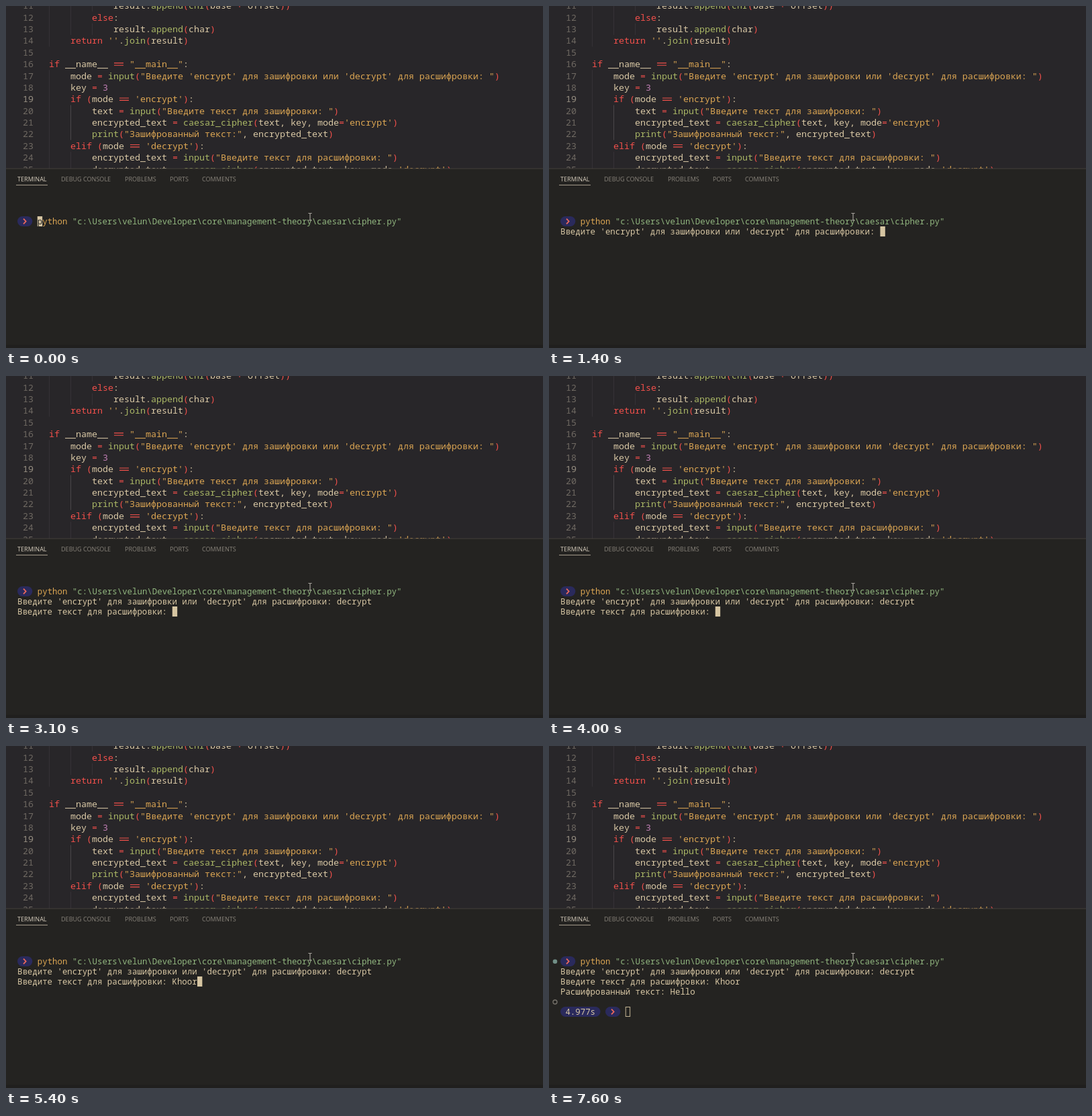
Animation, 800 px wide and 509 px high, one loop 7700 ms. Source, as an HTML page:

```html
<!DOCTYPE html>
<html lang="ru">
<head>
<meta charset="utf-8">
<title>Caesar cipher demo</title>
<style>
  html, body { margin: 0; width: 100%; height: 100%; overflow: hidden; background: #242321; }
  svg { display: block; width: 800px; height: 509px; }
  text { white-space: pre; }
  .code, .term { font-family: "Noto Sans Mono", "DejaVu Sans Mono", monospace; fill: #d9c8a5; }
  .code { font-size: 13.333px; }
  .term { font-size: 12.407px; }
  .tab { font-family: "Open Sans", "Noto Sans", sans-serif; font-size: 9.05px; fill: #8a857c; }
</style>
</head>
<body>
<svg id="stage" viewBox="0 0 800 509">
  <clipPath id="pane"><rect width="800" height="242"/></clipPath>
  <rect width="800" height="242" fill="#282629"/>
  <g id="editor" class="code" clip-path="url(#pane)"></g>
  <rect y="242" width="800" height="267" fill="#242321"/>
  <rect y="241.5" width="800" height="1" fill="#45413c"/>
  <rect y="504" width="800" height="5" fill="#201f1e"/>
  <g id="tabs"></g>
  <rect x="15" y="266" width="47" height="1" fill="#a39a8a"/>
  <g id="terminal" class="term"></g>
  <path d="M450.5 308.5h2l.5 .7 .5-.7h2M453 309v9.5M450.5 319h2l.5-.7 .5 .7h2" fill="none" stroke="#b9b5ae"/>
</svg>
<script>
const LOOP = 7700;
const COLORS = { red: '#f2504b', str: '#dca653', fn: '#a9b665', num: '#c07fb4', fg: '#d9c8a5', dark: '#242321' };
const CODE = [
  "            result.append(chr(base + offset))",
  "        else:",
  "            result.append(char)",
  "    return ''.join(result)",
  "",
  "if __name__ == \"__main__\":",
  "    mode = input(\"Введите 'encrypt' для зашифровки или 'decrypt' для расшифровки: \")",
  "    key = 3",
  "    if (mode == 'encrypt'):",
  "        text = input(\"Введите текст для зашифровки: \")",
  "        encrypted_text = caesar_cipher(text, key, mode='encrypt')",
  "        print(\"Зашифрованный текст:\", encrypted_text)",
  "    elif (mode == 'decrypt'):",
  "        encrypted_text = input(\"Введите текст для расшифровки: \")",
  "        decrypted_text = caesar_cipher(encrypted_text, key, mode='decrypt')"
];
const FIRST_LINE = 11, ACTIVE_LINE = 19;
const $ = id => document.getElementById(id);

function el(parent, tag, attrs = {}, content) {
  const node = document.createElementNS('http://www.w3.org/2000/svg', tag);
  for (const key in attrs) node.setAttribute(key, attrs[key]);
  if (content !== undefined) node.textContent = content;
  parent.appendChild(node);
  return node;
}

// Editor
const CHAR = 8, CODE_X = 64;
const baseline = n => 21.7 + (n - 12) * 17.37;

function guide(x, from, to, color) {
  const y = baseline(from) - 13.2;
  el($('editor'), 'rect', { x, y, width: 1, height: baseline(to) + 4.1 - y, fill: color });
}

function tokenColor(token, rest) {
  if (/^["']/.test(token)) return COLORS.str;
  if (/^\d/.test(token)) return COLORS.num;
  if (/^(if|elif|else|return)$/.test(token) || /^[=+()]/.test(token)) return COLORS.red;
  if (/^\w/.test(token) && rest[0] === '(') return COLORS.fn;
  return COLORS.fg;
}

function codeLine(source, n) {
  const y = baseline(n), editor = $('editor');
  el(editor, 'text', { x: 41, y, 'text-anchor': 'end', fill: n === ACTIVE_LINE ? '#989083' : '#6f6962' }, n);
  const indent = source.search(/\S/);
  if (indent < 0) return;
  const line = el(editor, 'text', { x: CODE_X + indent * CHAR, y });
  for (const match of source.matchAll(/"[^"]*"|'[^']*'|\w+|==|\s+|./g)) {
    const token = match[0], at = match.index;
    if (at < indent) continue;
    if (token === '==') {
      const x = CODE_X + at * CHAR + 1;
      el(editor, 'path', { d: `M${x} ${y - 6.3}h14M${x} ${y - 2.9}h14`, stroke: COLORS.red, 'stroke-width': 1.1 });
      el(line, 'tspan', {}, '  ');
    } else {
      el(line, 'tspan', { fill: tokenColor(token, source.slice(at + token.length)) }, token);
    }
  }
}

guide(64, 11, 14, '#353236');
guide(96, 11, 13, '#353236');
guide(128, 11, 11, '#353236');
guide(128, 13, 13, '#353236');
guide(64, 17, 25, '#353236');
guide(96, 20, 22, '#4a464a');
guide(96, 24, 25, '#353236');
CODE.forEach((source, i) => codeLine(source, FIRST_LINE + i));

// Panel tabs
[['TERMINAL', 17], ['DEBUG CONSOLE', 82], ['PROBLEMS', 177], ['PORTS', 244], ['COMMENTS', 292]]
  .forEach(([name, x], i) => {
    const tab = el($('tabs'), 'text', { class: 'tab', x, y: 260.7 }, name);
    if (!i) tab.style.fill = '#d6cdbd';
  });

// Terminal
const term = $('terminal');
const colX = col => 17 + col * 7.444;
const rowY = row => 313 + row * 15;
const termText = (parent, row, col, content, fill = COLORS.fg) =>
  el(parent, 'text', { x: colX(col), y: rowY(row) + 11.6, fill }, content);

function pill(parent, row, col, cols) {
  el(parent, 'rect', { x: colX(col), y: rowY(row), width: colX(cols) - 17, height: 15, rx: 7.5, fill: '#2a2a5c' });
}

function promptMark(parent, row, col) {
  pill(parent, row, col, 3);
  el(parent, 'path', {
    d: `M${colX(col + 1) + 1.6} ${rowY(row) + 3.6}l3.6 3.9-3.6 3.9`,
    fill: 'none', stroke: '#f0695c', 'stroke-width': 1.8
  });
}

const cursor = el(term, 'rect', { width: 7.4, height: 15 });
promptMark(term, 0, 0);
const command = termText(term, 0, 4, '', COLORS.str);
const firstLetter = el(command, 'tspan', {}, 'p');
el(command, 'tspan', {}, 'ython ');
el(command, 'tspan', { fill: '#91b67f' }, '"c:\\Users\\velun\\Developer\\core\\management-theory\\caesar\\cipher.py"');

const modeLine = termText(term, 1, 0, '');
const textLine = termText(term, 2, 0, '');
const result = el(term, 'g');
termText(result, 3, 0, 'Расшифрованный текст: Hello');
pill(result, 5, 0, 8);
termText(result, 5, 1, '4.977s');
promptMark(result, 5, 9);
el(result, 'circle', { cx: 9, cy: 320.7, r: 3.3, fill: '#718f87' });
el(result, 'circle', { cx: 9, cy: 381, r: 3, fill: 'none', stroke: '#77736c', 'stroke-width': 1.3 });

const MODE = { ask: "Введите 'encrypt' для зашифровки или 'decrypt' для расшифровки: ", answer: 'decrypt',
  start: 900, keys: [1600, 1700, 2000, 2200, 2300, 2400, 2500] };
const TEXT = { ask: 'Введите текст для расшифровки: ', answer: 'Khoor',
  start: 3000, keys: [4400, 4600, 5000, 5200, 5400] };
const DONE = 5600, BLUR = 7400;

const typed = (line, t) => t < line.start ? '' :
  line.ask + line.answer.slice(0, line.keys.filter(key => key <= t).length);

function cursorCell(t, mode, text) {
  if (t < MODE.start) return [0, 4];
  if (t < TEXT.start) return [1, mode.length];
  return t < DONE ? [2, text.length] : [5, 13];
}

function render(t) {
  const mode = typed(MODE, t), text = typed(TEXT, t);
  modeLine.textContent = mode;
  textLine.textContent = text;
  result.setAttribute('visibility', t < DONE ? 'hidden' : 'visible');
  firstLetter.setAttribute('fill', t < MODE.start ? COLORS.dark : COLORS.str);

  const [row, col] = cursorCell(t, mode, text), hollow = t >= BLUR, inset = hollow ? 0.5 : 0;
  cursor.setAttribute('x', colX(col) + inset);
  cursor.setAttribute('y', rowY(row) + inset);
  cursor.setAttribute('width', 7.4 - 2 * inset);
  cursor.setAttribute('height', 15 - 2 * inset);
  cursor.setAttribute('fill', hollow ? 'none' : '#d6c5a2');
  cursor.setAttribute('stroke', hollow ? '#c4b594' : 'none');
}

const began = performance.now();
function tick() {
  render((performance.now() - began) % LOOP);
  requestAnimationFrame(tick);
}
tick();
</script>
</body>
</html>
```
